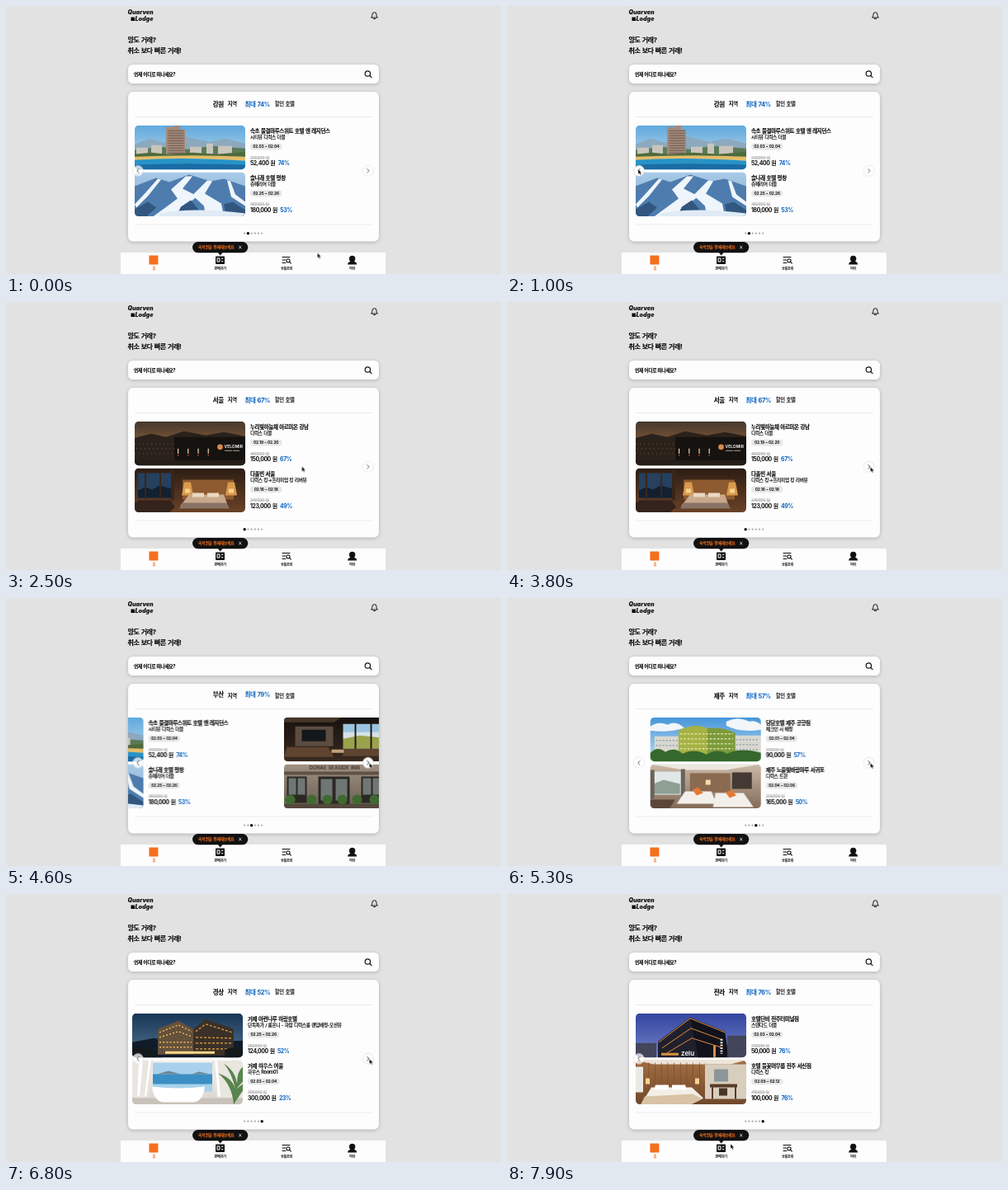
Animation, 600 px wide and 325 px high, one loop 8000 ms. Source, as an HTML page:

```html
<!DOCTYPE html>
<html lang="ko">
<head>
<meta charset="utf-8">
<style>
html, body { margin: 0; width: 100%; height: 100%; overflow: hidden; background: #e2e2e2; }
svg { display: block; width: 600px; height: 325px; }
text { font-family: Inter, "Noto Sans CJK KR", "Noto Sans CJK", sans-serif; font-weight: 700; letter-spacing: -.06em; word-spacing: .1em; fill: #111; white-space: pre; }
.logo { font: italic 900 7.1px Inter, sans-serif; letter-spacing: 0; }
.hello { font-size: 8.1px; }
.ask { font-size: 5.7px; }
.region { font-size: 7.5px; }
.plain { font-size: 6.4px; }
.name { font-size: 6.5px; }
.hello, .ask, .region, .name { stroke: #111; stroke-width: .15px; }
.room { font-size: 5.7px; }
.date { font-size: 4.8px; letter-spacing: -.03em; word-spacing: 0; text-anchor: middle; }
.old { font-size: 5px; font-weight: 400; fill: #999; text-decoration: line-through; }
.price { font-size: 6.9px; }
.blue { fill: #0560bf; stroke: none; }
.tip { font-size: 4.9px; fill: #f4701e; }
.nav { font-size: 4.15px; text-anchor: middle; }
.sign { letter-spacing: 0; font-weight: 600; }
.panel { fill: #fdfdfd; filter: drop-shadow(0 1px 2px rgba(0, 0, 0, .22)); }
.line { fill: none; stroke: #111; stroke-linecap: round; stroke-linejoin: round; }
#cursor { animation: cursor 8s linear infinite; }
@keyframes cursor {
  0%, 2.5% { transform: translate(377.5px, 299.5px); animation-timing-function: ease-in-out; }
  11.25%, 25% { transform: translate(159px, 198px); animation-timing-function: ease-in-out; }
  35%, 87.5% { transform: translate(440.5px, 200px); animation-timing-function: ease-in-out; }
  90.5% { transform: translate(487px, 240px); }
  93.5% { transform: translate(482px, 288px); animation-timing-function: ease-out; }
  98.75%, 100% { transform: translate(271px, 303px); }
}
</style>
</head>
<body>
<svg viewBox="0 0 600 325">
  <defs id="defs">
    <clipPath id="view"><rect x="148" y="140" width="304" height="120"/></clipPath>
    <clipPath id="round"><rect width="134" height="53.5" rx="5"/></clipPath>
  </defs>

  <text class="logo" x="147.5" y="10.3">Quarven</text>
  <rect x="151.5" y="13.6" width="4.4" height="4.4"/>
  <text class="logo" x="156.6" y="18.3">Lodge</text>
  <path class="line" d="M442.8 13.8c1.2-1 1.1-2.2 1.2-3.6a2.5 2.5 0 0 1 5 0c.1 1.4 0 2.6 1.2 3.6zM445.5 15.6h2" stroke-width="1"/>
  <text class="hello" x="147.5" y="43.8">양도 거래?</text>
  <text class="hello" x="147.5" y="57">취소 보다 빠른 거래!</text>

  <rect class="panel" x="148" y="71" width="304" height="23" rx="5.5"/>
  <text class="ask" x="155" y="84.6">언제 어디로 떠나세요?</text>
  <g class="line" stroke-width="1.2"><circle cx="438.4" cy="82" r="3.2"/><path d="M440.8 84.4l2.2 2.2"/></g>

  <rect class="panel" x="148" y="104" width="304" height="181.5" rx="6"/>
  <path d="M155.5 134.5h288M155.5 265h288" stroke="#e6e6e6" stroke-width=".7"/>
  <text class="plain" x="268.7" y="121.4">지역</text>
  <text class="plain" x="325.8" y="121.4">할인 호텔</text>
  <g id="heads"></g>
  <g clip-path="url(#view)"><g id="track"></g></g>
  <g id="arrows"></g>
  <g id="dots"></g>

  <rect x="139" y="299" width="321" height="26" fill="#fdfdfd"/>
  <rect x="173.4" y="302.5" width="11" height="11" fill="#f4701e"/>
  <rect x="254" y="303.5" width="11" height="9.5" rx=".8" fill="#111"/>
  <path d="M256 306h3v4h-3zM261 306.3h2.3M261 309.7h2.3" fill="none" stroke="#fff" stroke-width="1"/>
  <g class="line" stroke-width="1.1"><path d="M335 304.5h9M335 308h3.5M335 311.5h4"/><circle cx="342" cy="308.8" r="2.1"/><path d="M343.6 310.4l1.8 1.8"/></g>
  <path d="M419.7 302.8c2.4 0 3.7 1.6 3.7 3.7 0 1.4-.7 2.6-1.6 3.2 2 .5 3.4 1.5 3.4 3.7h-11c0-2.2 1.4-3.2 3.4-3.7-.9-.6-1.6-1.8-1.6-3.2 0-2.1 1.3-3.7 3.7-3.7z" fill="#111"/>
  <text class="nav" x="179.4" y="319.6" style="fill:#f4701e">홈</text>
  <text class="nav" x="259.7" y="319.6">판매하기</text>
  <text class="nav" x="340" y="319.6">상품조회</text>
  <text class="nav" x="419.7" y="319.6">마이</text>

  <path d="M256.5 298.5h6.4l-3.2 4z" fill="#111"/>
  <rect x="226" y="286" width="67.3" height="13.2" rx="6.6" fill="#111"/>
  <text class="tip" x="233" y="294.4">숙박권을 판매해보세요.</text>
  <path d="M282.2 291l3.2 3.2M285.4 291l-3.2 3.2" stroke="#fff" stroke-width=".8"/>

  <path id="cursor" d="M0 0v6l1.4-1.2 1 2.2 1.1-.5-1-2.1h1.9z" fill="#000" stroke="#fff" stroke-width=".4"/>
</svg>

<script>
const LOOP = 8000, PITCH = 304, SLIDE = 450, HEAD_LAG = 60;
const START = 1;
const clicks = [[1446, 0], [3850, 1], [4489, 2], [4985, 3], [5800, 4], [6792, 5]];
const states = [[0, START], ...clicks];

const $ = id => document.getElementById(id);
const text = (cls, x, y, s, more = '') => `<text class="${cls}" x="${x}" y="${y}" ${more}>${s}</text>`;
const shape = (fill, d) => `<path fill="${fill}" d="${d}"/>`;
const stripe = (color, width, dash, d) =>
  `<path fill="none" stroke="${color}" stroke-width="${width}" stroke-dasharray="${dash}" d="${d}"/>`;
const sign = (x, y, size, s, fill) => text('sign', x, y, s, `style="font-size:${size}px;fill:${fill}"`);

// Each photo: top tone, bottom tone, then flat shapes in a 134 x 53.5 box
const photos = [
  ['#43382f', '#c0773a',
    shape('#2a211b', 'M0 20l20-5 18 4 22-7 26 5 22-4 26 5v36H0z') +
    shape('#15120f', 'M48 19h86v29H48z') + shape('#241d18', 'M0 47h134v7H0z') +
    stripe('#6d4a2c', 1.2, '1 4', 'M0 27h48M2 33h46M0 39h48') +
    stripe('#e9d7b8', 6, '1.2 11', 'M52 36h46') + stripe('#c8452f', 2, '1.2 11', 'M52 41h46') +
    '<circle cx="103.5" cy="31" r="3.4" fill="#d58a4a"/>' + sign(108.5, 32.4, 5, 'VELOMIR', '#fff') +
    stripe('#cfc6ba', .8, '9 1', 'M109 35.5h18')],
  ['#2c1d14', '#6b4127',
    shape('#26405e', 'M4 6h41v30H4z') + shape('#12202f', 'M4 27l9-4 8 3 9-5 15 4v11H4z') +
    shape('#3a261a', 'M12 5h2v32h-2zM30 5h2v32h-2zM44 3h4v36h-4z') +
    shape('#8e5a30', 'M58 14h62v24H58z') + shape('#d99a4e', 'M60 17l8 0 3 16H57zM113 17h8l3 16h-14z') +
    shape('#f6d28c', 'M61 25h6v5h-6zM114 25h6v5h-6z') +
    shape('#c9a98a', 'M66 32h42l5 14H55z') + shape('#ead8c2', 'M70 30h14v5H70zM88 30h14v5H88z') +
    shape('#8a7466', 'M58 42h53l4 7H54z') + shape('#33231c', 'M5 39h38l6 8-8 7H0V42z')],
  ['#5fa9de', '#cfe2ee',
    shape('#8ca9bd', 'M0 23l18-7 17 5 25-8 30 7 20-4 24 6v14H0z') +
    shape('#5c7a58', 'M0 30l30-4 34 3 30-4 40 3v12H0z') +
    shape('#a48a78', 'M38 2h10V0h7v5h6v31H38z') + stripe('#6b5a54', 19, '1 2', 'M50 6v29') +
    shape('#c9c5bd', 'M2 27h14v8H2zM20 24h13v11H20zM67 26h14v9H67zM87 22h8v13h-8zM101 25h17v10h-17z') +
    shape('#4e6b3c', 'M0 35l20-2 20 2 30-2 30 2 34-3v7H0z') +
    shape('#e2bd69', 'M0 38q70-3 134 0v5Q60 38 0 43z') + shape('#2793c6', 'M0 42q60-4 134 1v11H0z') +
    shape('#1a6ca5', 'M0 48q60-3 134 0v6H0z')],
  ['#a9cbe8', '#7ea4cc',
    shape('#4e7cae', 'M0 17L26 7l16 5L66 3l26 8 16-3 26 9v37H0z') +
    shape('#eef5fb', 'M62 5l8 0-12 15 18 9-30 25H22l30-22-8-11zM88 10l6 1-9 15 20 12 3 16H86l-2-13-14-13zM28 8l4 1-16 20L2 43l-2-4 13-14zM112 10l4 1 6 16 12 9v5l-17-11z') +
    shape('#31567f', 'M0 45l16-9 10 7-12 11H0zM56 42l12-8 10 12-6 8H50zM108 39l11-3 15 10v8h-23z') +
    shape('#e0ebf5', 'M30 50q40-8 104 0v4H30z')],
  ['#17120f', '#3a2a20',
    shape('#463628', 'M0 0h70l-9 6H0z') + shape('#5d4c40', 'M14 11h46v24H14z') + shape('#15181b', 'M22 15h29v14H22z') +
    shape('#9cc5e0', 'M72 8l50 0v30H72z') + shape('#d7e2e6', 'M72 18h50v8H72z') +
    shape('#9aa24b', 'M72 26l20-4 30 3v13H72z') + shape('#231a15', 'M86 7h2v32h-2zM105 7h2v32h-2z') +
    shape('#5f4430', 'M4 36h50l7 12H0zM74 38h44v9H71z') + shape('#c2a27c', 'M58 39h15v4H58z')],
  ['#a09182', '#6b5f54',
    shape('#5f5348', 'M0 9h134v4H0z') + shape('#2c2825', 'M4 15h24v32H4zM42 15h38v35H42zM94 15h25v32H94z') +
    shape('#6f7775', 'M6 17h9v20H6zM17 17h9v20h-9zM45 18h14v26H45zM63 18h14v26H63zM96 17h10v20H96zM108 17h9v20h-9z') +
    sign(31, 6.8, 6, 'DORAE SEASIDE INN', '#3b332d') + shape('#54483d', 'M0 48h134v6H0z') +
    [8, 34, 53, 71, 89, 110].map(x => `<circle cx="${x}" cy="43" r="6" fill="#40692f"/>`).join('')],
  ['#4596d9', '#c3dff3',
    shape('#f2f6f9', 'M0 11q10-7 21-2q10-6 20 4q-20 6-41 3zM92 5q14-7 28 0q8-2 14 4v6q-25 4-42-5z') +
    shape('#d8d8d1', 'M5 23h30v24H5zM102 22h32v26h-32z') + stripe('#8a98a1', 1.3, '2 2', 'M7 28h27M7 34h27M104 27h28M104 33h28M104 39h28') +
    shape('#a6b244', 'M34 16q20-10 35-3v36H34z') + shape('#7c9b3b', 'M69 13q20-2 34 6v30H69z') +
    stripe('#e3e3ac', 1.5, '2.5 2', 'M36 20h64M36 26h64M36 32h64M36 38h64') +
    shape('#35682c', 'M0 43q9-9 18-1q11-7 21 2q14-7 29 1q13-8 25-1q16-8 41-1v12H0z')],
  ['#cbb9a6', '#846b58',
    shape('#ece7df', 'M0 0h134L92 7H40z') + shape('#dfe8e7', 'M2 9h36v28H2z') + shape('#8f9f94', 'M4 24l12-5 20 5v12H4z') +
    shape('#6b625b', 'M0 7h5v35H0zM37 6h5v33h-5z') + shape('#8a6a50', 'M48 11h49v23H48z') + shape('#443a33', 'M99 10h24v20H99z') +
    shape('#f3ddb0', 'M67 19h6v6h-6z') + shape('#f3f0eb', 'M42 33h32l6 15H32zM79 35h34l12 17H76z') +
    shape('#e07b35', 'M51 31l7-3 6 7-8 3zM91 34l8-3 5 7-8 3z') + shape('#5b4638', 'M0 43h30l-7 11H0z')],
  ['#183654', '#527395',
    shape('#101c2a', 'M0 35l26-5 34 6 74-3v21H0z') + shape('#64513c', 'M31 19L56 9l18 10v31H31z') +
    shape('#3b3028', 'M74 19l15-12 34 12v32H74z') +
    stripe('#f0bb5c', 1.4, '2 2.2', 'M33 23l23-9 16 8M33 29l23-7 16 6M33 35l39 0M33 41h39') +
    stripe('#e8a447', 1.2, '3 2', 'M77 22l12-9 32 10M77 29l44 1M77 36h44M77 43h44') +
    shape('#ffd98b', 'M40 46h60v3H40z') + shape('#14191c', 'M0 45q13-10 27 2l10 7H0zM112 44q10-5 22 0v10h-22z')],
  ['#f4f3ef', '#d8d3cc',
    shape('#a7d1ed', 'M25 3h72v35H25z') + shape('#3c8fc4', 'M25 17h72v12H25z') + shape('#6d8793', 'M30 17l14-4 15 4zM72 17l9-3 13 3z') +
    shape('#e9e5df', 'M0 0h26q-3 22-7 45H0zM96 0h38v46h-31z') + shape('#fff', 'M8 0h5L9 44H6zM20 0h3l-6 44h-2zM100 0h3l4 44h-3z') +
    shape('#c9c2b9', 'M0 46h134v8H0z') + shape('#fff', 'M24 32q32 4 64 0q-2 18-14 19H38Q26 50 24 32z') +
    shape('#58854d', 'M123 54q-2-25-19-38q17 5 21 19q-4-19-14-31q14 9 16 24q0-14 7-20v18l-8 9 8-6v8l-8 12z')],
  ['#3345a0', '#7383c8',
    shape('#20202d', 'M27 34L66 5l28 14v35H27z') + shape('#11121b', 'M66 5l42 17 5 32H76z') +
    shape('#43455b', 'M0 36h25v18H0zM111 27h23v27h-23z') +
    stripe('#e28a3f', 1, 'none', 'M28 35L66 6l42 17M32 42l35-24 38 14M38 48l30-18 35 11') +
    shape('#d8913e', 'M31 48h21v3H31zM94 39h3v14h-3z') + sign(55, 51, 8, 'zelu', '#fff') +
    stripe('#e9e2d6', 3, '2 1.4', 'M104 31v18')],
  ['#a36f43', '#71472b',
    shape('#ece4d8', 'M0 0h134l-19 5H22z') + stripe('#7b4d2c', 42, '.7 7', 'M0 24h85') +
    shape('#d8cebe', 'M84 5h50v42H84z') + shape('#ece9e2', 'M0 8h9v31H0z') + shape('#5a3c28', 'M90 29h33v4H90zM92 33h2v14h-2zM120 33h2v14h-2z') +
    shape('#8c9699', 'M95 11h17v15H95z') + shape('#4a3426', 'M101 34h10v9h-10z') +
    shape('#f3eee6', 'M19 33h49l14 13-16 8H6z') + shape('#d8c3a6', 'M11 44l58-3 12 6-15 7H6z') +
    shape('#fff', 'M24 30h16v6H22zM44 30h16l2 6H44z') + shape('#f8d58e', 'M12 22h5v7h-5zM72 22h5v7h-5z')],
];

// Region, discount, then two stays: name, room, dates, old price, price, discount
const regions = [
  ['서울', 67,
    ['누리빛하늘채 아르미온 강남', '디럭스 더블', '02.19 ~ 02.20', '460000', '150,000', 67],
    ['다올빈 서울', '디럭스 킹→프리미엄 킹 리버뷰', '02.16 ~ 02.18', '240000', '123,000', 49]],
  ['강원', 74,
    ['속초 물결마루스위트 호텔 앤 레지던스', '시티뷰 디럭스 더블', '02.03 ~ 02.04', '200000', '52,400', 74],
    ['솔나래 호텔 평창', '슈페리어 더블', '02.25 ~ 02.26', '380000', '180,000', 53]],
  ['부산', 79,
    ['해운대 파랑누리 호텔', '디럭스 트윈', '02.05 ~ 02.06', '280000', '58,800', 79],
    ['부산 도래 호텔', '스탠다드 더블', '02.10 ~ 02.11', '150000', '60,000', 60]],
  ['제주', 57,
    ['담담호텔 제주 공항점', '체크인 시 배정', '02.01 ~ 02.04', '210000', '90,000', 57],
    ['제주 노을빛바람마루 서귀포', '디럭스 트윈', '02.04 ~ 02.06', '330000', '165,000', 50]],
  ['경상', 52,
    ['거제 아련나루 하람호텔', '단독특가 / 룸온니 - 하람 디럭스룸 랜덤배정-오션뷰', '02.25 ~ 02.26', '260000', '124,000', 52],
    ['거제 하우스 여울', '하우스 Room01', '02.03 ~ 02.04', '390000', '300,000', 23]],
  ['전라', 76,
    ['호텔단비 전주터미널점', '스탠다드 더블', '02.03 ~ 02.04', '210000', '50,000', 76],
    ['호텔 들꽃머무름 전주 서신점', '디럭스 킹', '02.09 ~ 02.12', '410000', '100,000', 76]],
];

const stay = ([name, room, dates, old, price, off], row, k) => {
  const id = 2 * k + row, [top, bottom, art] = photos[id];
  $('defs').innerHTML += `<linearGradient id="tone${id}" x2="0" y2="1"><stop stop-color="${top}"/><stop offset="1" stop-color="${bottom}"/></linearGradient>`;
  return `<g transform="translate(156 ${144.8 + 56.8 * row})">
    <g clip-path="url(#round)"><rect width="134" height="53.5" fill="url(#tone${id})"/>${art}</g>
    ${text('name', 140, 9.6, name)}${text('room', 140, 16.6, room)}
    <rect x="140" y="21.6" width="38.5" height="8" rx="4" fill="#e7e7e7"/>${text('date', 159.2, 27.3, dates)}
    ${text('old', 140, 40.9, old + ' 원')}
    ${text('price', 140, 48.6, `${price} 원<tspan class="blue" dx="3.4">${off}%</tspan>`)}</g>`;
};

$('track').innerHTML = regions.map(([, , ...stays], k) =>
  `<g transform="translate(${k * PITCH} 0)">${stays.map((s, row) => stay(s, row, k)).join('')}</g>`).join('');
$('heads').innerHTML = regions.map(([name, off], k) =>
  `<g id="head${k}">${text('region', 250.7, 121.8, name)}${text('region blue', 289.5, 121.8, `최대 ${off}%`)}</g>`).join('');
$('dots').innerHTML = regions.map((_, k) => {
  const at = `cx="${289.2 + k * 4.2}" cy="275.7"`;
  return `<circle ${at} r="1.1" fill="#aaa"/><circle id="dot${k}" ${at} r="1.75" fill="#111"/>`;
}).join('');
const arrow = (id, x, dir) => `<g id="${id}" transform="translate(${x} 199.8)">
  <circle r="6.4" fill="#fff" stroke="#d4d4d4" stroke-width=".6"/>
  <path class="line" d="M${-dir} -2.3l${dir * 2.3} 2.3l${-dir * 2.3} 2.3" stroke-width=".9"/></g>`;
$('arrows').innerHTML = arrow('prev', 160, -1) + arrow('next', 438.8, 1);

// Keyframes written from [ms, css] pairs
let css = '';
const animate = (id, timing, frames) => {
  const last = frames[frames.length - 1];
  css += `#${id}{animation:${id} ${LOOP}ms ${timing} infinite}@keyframes ${id}{` +
    [...frames, [LOOP, last[1]]].map(([ms, rule]) => `${(ms / LOOP * 100).toFixed(4)}%{${rule}}`).join('') + '}';
};
const move = (x, y) => `transform:translate(${x}px,${y}px)`;
const fade = frames => frames.map(([ms, o]) => [ms, `opacity:${o}`]);

animate('track', 'ease', [[0, move(-START * PITCH, 0)], ...clicks.flatMap(([ms, k], i) =>
  [[ms, move(-states[i][1] * PITCH, 0)], [ms + SLIDE, move(-k * PITCH, 0)]])]);
animate('heads', 'ease-out', [[0, move(0, 0)], ...clicks.flatMap(([ms]) =>
  [[ms + HEAD_LAG - .1, move(0, 0)], [ms + HEAD_LAG, move(0, -3)], [ms + HEAD_LAG + 350, move(0, 0)]])]);
regions.forEach((_, k) => {
  animate('dot' + k, 'step-end', fade(states.map(([ms, s]) => [ms, +(s === k)])));
  animate('head' + k, 'step-end', fade(states.map(([ms, s]) => [ms && ms + HEAD_LAG, +(s === k)])));
});
animate('prev', 'step-end', fade([[0, .75], [850, 1], [1925, 0], [3900, .75]]));
animate('next', 'step-end', fade([[0, .75], [2700, 1], [7050, .75], [7290, 0]]));

document.head.appendChild(document.createElement('style')).textContent = css;
</script>
</body>
</html>
```
